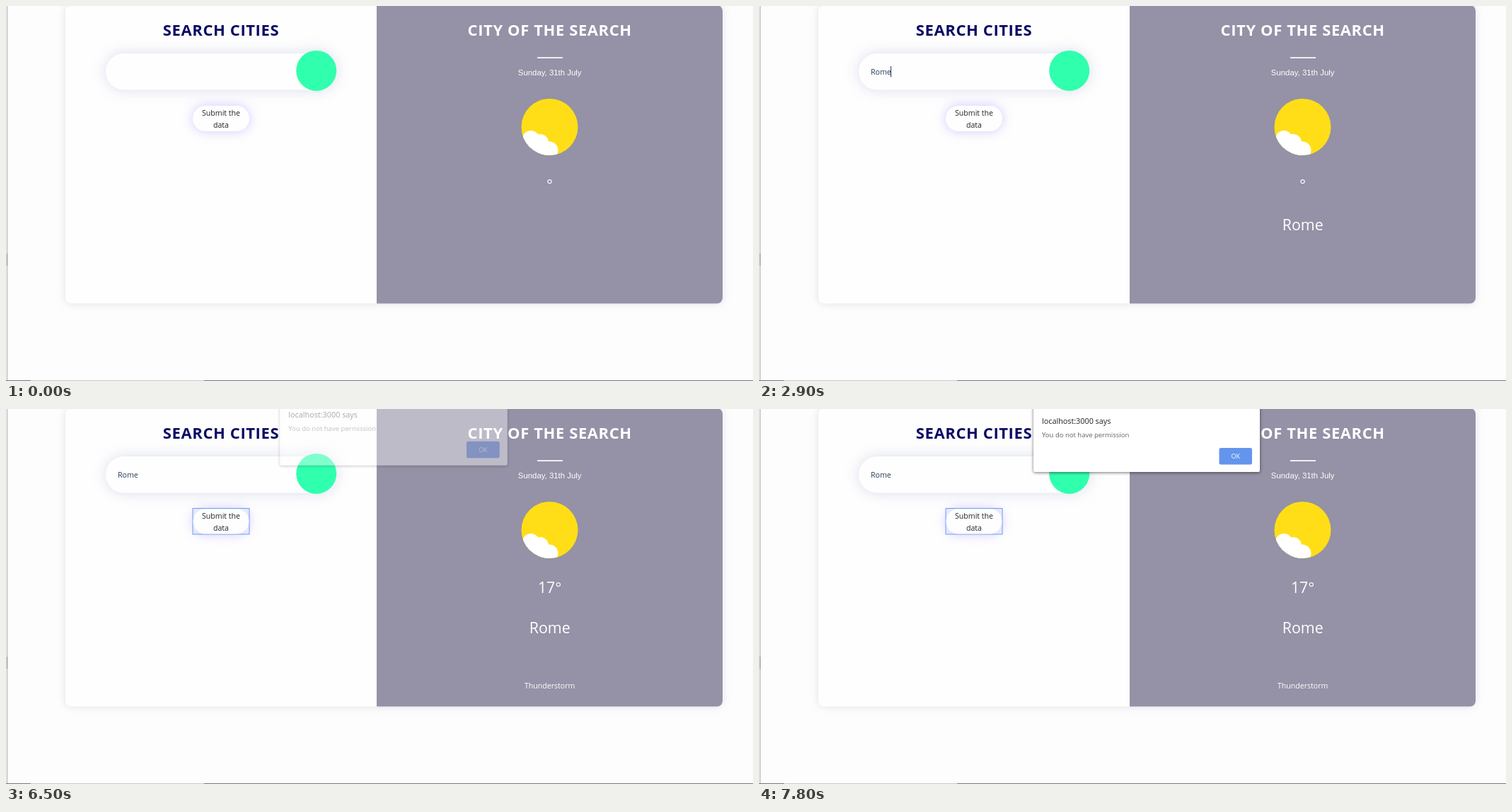
Recreate the animation shown at these times as an HTML page. Size 1056 by 530 pixels, loop 8000 ms.

```html
<!DOCTYPE html>
<html lang="en">
<head>
<meta charset="utf-8">
<title>Search cities</title>
<style>
  html, body { margin: 0; width: 100%; height: 100%; overflow: hidden; background: #fdfdfd; }
  svg { display: block; width: 1056px; height: 530px; font: 10.6px "Open Sans", "Noto Sans", sans-serif; }
  .mid { text-anchor: middle; }
  .light { fill: #fff; }
  .head { font-size: 22px; font-weight: 700; letter-spacing: .6px; }
  .big { font-size: 21.4px; }
  .date { font: 11.4px "Liberation Sans", Arial, sans-serif; }
  .focus { fill: #e9e8f8; stroke: #6b9bfa; }
  #card { filter: drop-shadow(0 0 6px rgba(60, 60, 110, .14)); }
  #field { filter: drop-shadow(0 0 10px rgba(90, 110, 170, .22)); }
  #submit { filter: drop-shadow(0 0 8px rgba(110, 90, 255, .32)); }
  #box { filter: drop-shadow(0 1px 2px rgba(0, 0, 0, .55)); }
</style>
</head>
<body>
<svg viewBox="0 0 1056 530">
  <clipPath id="sun"><circle cx="768.5" cy="171" r="40"/></clipPath>

  <!-- window edges -->
  <path d="M1.5 0V530" stroke="#aaa"/>
  <path d="M1.5 350V367" stroke="#777"/>
  <path d="M0 529.5H1056" stroke="#77777b"/>
  <path d="M35 529.5H280" stroke="#c8c8c8"/>

  <rect id="card" x="84" y="-1" width="929" height="421.5" rx="8" fill="#fefefe"/>
  <path d="M524-1H1005a8 8 0 0 1 8 8V412.500a8 8 0 0 1-8 8H524Z" fill="#9591a6"/>

  <!-- search form -->
  <text class="head mid" x="304" y="41.500" fill="#0a0a64">SEARCH CITIES</text>
  <g id="field">
    <rect x="141" y="67" width="326" height="51.500" rx="25.700" fill="#fefefe"/>
    <circle cx="438.500" cy="91.500" r="28.500" fill="#fefefe"/>
  </g>
  <rect id="goFocus" class="focus" x="410" y="62.500" width="57.500" height="57.500"/>
  <circle cx="438.700" cy="91.400" r="28.500" fill="#30ffae"/>
  <text id="query" x="158" y="97" fill="#24395c"></text>
  <rect id="caret" y="85" width="1" height="15.500" fill="#24395c"/>
  <rect id="submit" x="264" y="141" width="80" height="36" rx="18" fill="#fefefe"/>
  <g id="submitFocus">
    <rect class="focus" x="264" y="140.500" width="80" height="36.500"/>
    <rect x="264.500" y="141" width="79" height="35.500" rx="17.700" fill="#fefefe"/>
  </g>
  <g class="mid" fill="#212529">
    <text x="304" y="154.500">Submit the</text>
    <text x="304" y="171.500">data</text>
  </g>

  <!-- weather panel -->
  <g class="light mid">
    <text class="head" x="768.700" y="41.500">CITY OF THE SEARCH</text>
    <rect x="751" y="72.300" width="36" height="1.700"/>
    <text class="date" x="768.700" y="98">Sunday, 31th July</text>
    <circle cx="768.500" cy="171" r="40" fill="#ffde17"/>
    <g clip-path="url(#sun)">
      <circle cx="742" cy="188" r="12"/>
      <circle cx="755" cy="193" r="12"/>
      <circle cx="768" cy="204" r="12.500"/>
      <path d="M728 186L742 188L768 204V215H728Z"/>
    </g>
    <text id="temp" class="big" x="768.700" y="260"></text>
    <text id="city" class="big" x="768.700" y="316.500"></text>
    <text id="sky" x="768.700" y="395">Thunderstorm</text>
  </g>

  <!-- alert -->
  <g id="alert">
    <rect id="box" x="388" y="-30" width="320" height="119" rx="2" fill="#fff"/>
    <text x="400" y="21" font-size="10.800" fill="#202124">localhost:3000 says</text>
    <text x="400" y="40" font-size="9.500" fill="#5f6368">You do not have permission</text>
    <rect x="650.500" y="55" width="46.500" height="23.500" rx="2.500" fill="#6495ed"/>
    <text class="light mid" x="673.700" y="70.300" font-size="8.800">OK</text>
  </g>
</svg>
<script>
  const LOOP = 8000;
  const el = id => document.getElementById(id);
  const show = (id, on) => el(id).setAttribute("visibility", on ? "visible" : "hidden");
  const write = (id, text) => { if (el(id).textContent !== text) el(id).textContent = text; };
  const keyTimes = [2300, 2700, 2800, 2900];
  // alert entrance, one step per 100 ms: rise, opacity, scale
  const entrance = [[-9.3, .38, 1.005], [-1.4, .98, 1], [0, 1, 1]];

  function caretOn(t) {
    if (t < 600 || t >= 3900) return false;
    const lastKey = keyTimes.filter(k => k <= t).pop() ?? 600;
    return Math.floor((t - lastKey) / 500) % 2 === 0;
  }

  function draw(t) {
    const typed = "Rome".slice(0, keyTimes.filter(k => k <= t).length);
    write("query", typed);
    write("city", typed);
    write("temp", t < 4200 ? "°" : "17°");
    show("sky", t >= 4200);

    show("caret", caretOn(t));
    el("caret").setAttribute("x", Math.round(158 + (typed ? el("query").getComputedTextLength() - .5 : 0)));
    show("goFocus", t >= 3900 && t < 6400);
    show("submitFocus", t >= 6400);

    show("alert", t >= 6500);
    const step = Math.max(0, Math.min(2, Math.floor((t - 6500) / 100)));
    const [rise, opacity, scale] = entrance[step];
    el("alert").setAttribute("opacity", opacity);
    el("alert").setAttribute("transform", `translate(548 ${rise}) scale(${scale} 1) translate(-548 0)`);
  }

  let start;
  function tick(now) {
    start ??= now;
    draw((now - start) % LOOP);
    requestAnimationFrame(tick);
  }
  draw(0);
  requestAnimationFrame(tick);
</script>
</body>
</html>
```
